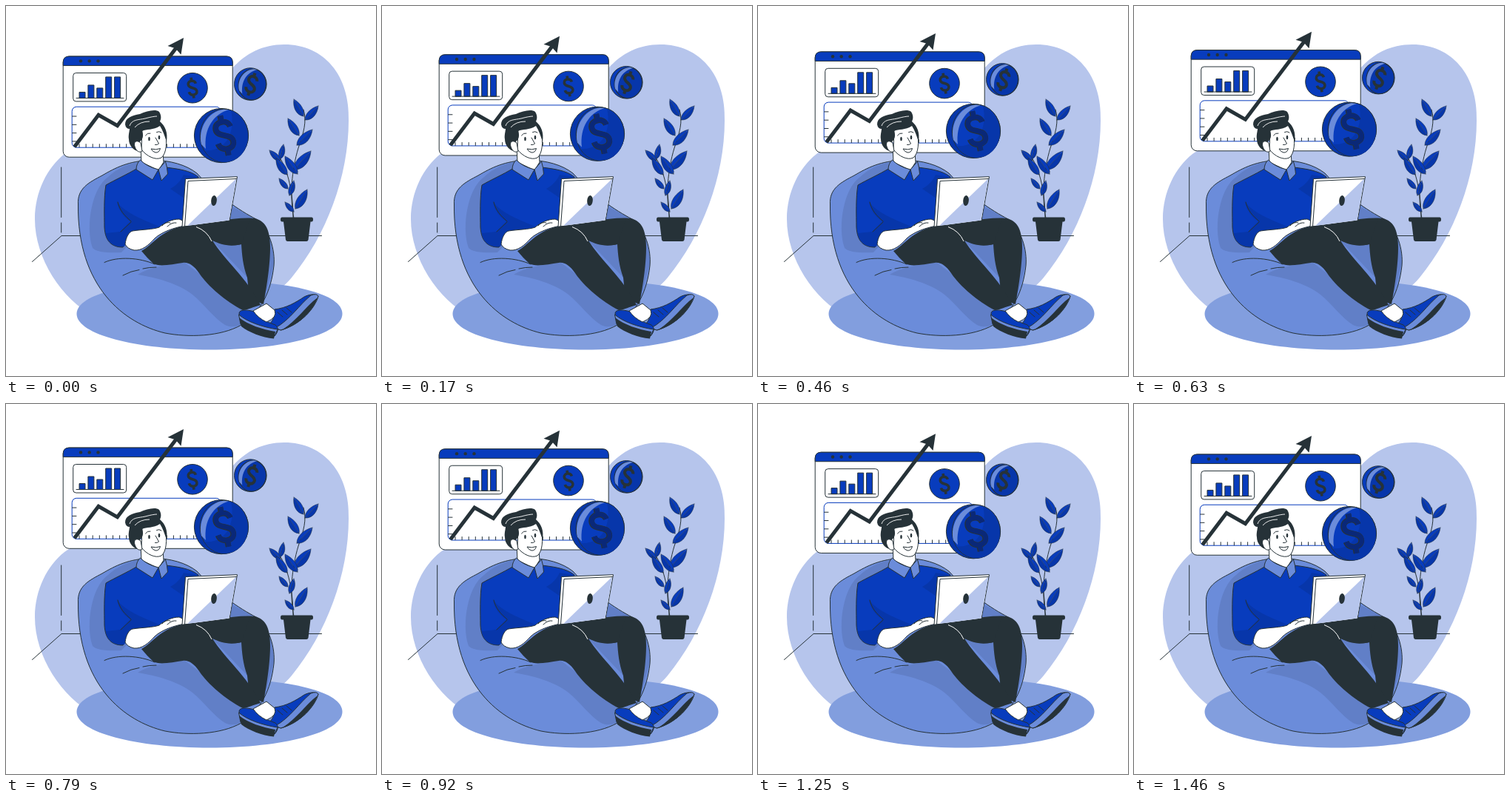
An HTML page that plays this animation: 500x500 px, repeating every 1.5 s.

```html
<!DOCTYPE html>
<html lang="en">
<head>
<meta charset="utf-8">
<title>Growing investments</title>
<style>
html, body { margin: 0; width: 100%; height: 100%; overflow: hidden; background: #fff; }
svg { display: block; width: 100vw; height: 100vh; }
.ink { fill: none; stroke: #263238; stroke-width: 1; stroke-linecap: round; stroke-linejoin: round; }
.edge { stroke: #263238; stroke-width: 1; stroke-linejoin: round; }
.fine { stroke-width: .5; }
.blue { fill: #083cbd; }
.deep { fill: #0736aa; }
.mid { fill: #6b8cda; }
.shade { fill: #617fc7; }
.pale { fill: #b6c5ec; }
.dark { fill: #263238; }
.white { fill: #fff; }
</style>
</head>
<body>
<svg viewBox="0 0 500 500" xmlns="http://www.w3.org/2000/svg">
  <defs>
    <path id="dollar" fill="none" d="M5.200 -5.400C4.400 -11 -5 -11 -5 -5.200C-5 .8 5.200 -.8 5.200 5.200C5.200 11 -4.600 11 -5.400 4.800M0 -14V-9.500M0 9.500V14"/>
    <path id="bag" d="M97.500 268C96 246 113 238 130 229C147 219 166 209 196 208.500C222 208 244 215 258 226C285 256 315 276 338 288C356 301 364 330 362 351C358 386 345 413 318 431C290 447 246 448 215 442C160 429 96 380 97.500 268Z"/>
  </defs>

  <!-- backdrop -->
  <path class="pale" d="M376 52C430 52 465 94 463 155C463 230 433 310 386 367C366 391 330 410 280 420H120C75 396 39 341 39 288C39 251 56 218 79 200C140 160 250 150 306 84C324 64 347 52 376 52Z"/>
  <path fill="#829ede" d="M95.500 416C95.500 389 170 371 275 371C386 371 454.500 389 454.500 416C454.500 444 374 464.500 275 464.500S95.500 444 95.500 416Z"/>
  <path class="ink" d="M35.500 345.500L75 310.500H102M353 310.500H426.500M74.700 218V285.500M74.700 293V306"/>

  <!-- plant -->
  <g id="plant">
    <path class="ink" d="M389 287C383 257 386 222 395 192C402 172 407 156 402 140M388 287C388 252 381 222 370 205"/>
  </g>
  <path class="dark" d="M373 285.500H413Q415 285.500 415 288.500T413 291.500H411.500L408.500 316Q408 318 406 318H380.500Q378.500 318 378 316L375 291.500H373Q371 291.500 371 288.500T373 285.500Z"/>

  <!-- floating dashboard -->
  <g id="float">
    <rect class="white edge" x="77.200" y="68.300" width="229" height="136.200" rx="8"/>
    <path class="blue edge" d="M77.200 80.800V76.300Q77.200 68.300 85.200 68.300H298.200Q306.200 68.300 306.200 76.300V80.800Z"/>
    <g class="dark"><circle cx="101" cy="74.600" r="2.200"/><circle cx="112.700" cy="74.600" r="2.200"/><circle cx="124.500" cy="74.600" r="2.200"/></g>
    <rect class="white edge" x="90.700" y="90.700" width="72" height="38.500" rx="4"/>
    <g id="bars" class="blue edge"></g>
    <path class="ink" d="M95 124.700H159"/>
    <rect x="89.200" y="136.500" width="201" height="55" rx="6" fill="#fff" stroke="#083cbd"/>
    <path id="ticks" class="ink"/>
    <path d="M92.500 190.500L125 147.500L150.500 162L231 55.500" fill="none" stroke="#263238" stroke-width="5"/>
    <path class="dark" d="M240 43.300L218.500 54.300L229 57.500L236.500 66Z"/>
    <circle class="blue edge" cx="252" cy="111" r="20.300"/>
    <use href="#dollar" transform="translate(252 111) rotate(-8)" stroke="#263238" stroke-width="3.600"/>

    <g transform="translate(330.300 105.800)">
      <circle class="blue edge" r="21.800"/>
      <ellipse class="deep edge" cx="2.500" cy=".3" rx="18.700" ry="20.800" transform="rotate(8)"/>
      <path d="M-15 9C-19 -6 -8 -20 5 -20.300L9 -19.500C-4 -16 -13 -5 -11 13Z" fill="#6b8cda"/>
      <use href="#dollar" transform="translate(1.500 .300) rotate(17) scale(1.130)" stroke="#263238" stroke-width="3.600"/>
    </g>

    <g transform="translate(291 175.300)">
      <circle class="deep edge" r="36.600"/>
      <ellipse class="blue edge" cx="3.800" cy=".2" rx="32.500" ry="36"/>
      <path class="deep" d="M13 -34C29 -27 36 -12 36 1C36 20 23 36 4 36C-7 36 -17 29 -23 20C5 23 20 -3 13 -34Z"/>
      <path d="M-27 12C-32 -9 -18 -33 3 -35.300L10 -34.700C-11 -29 -24 -8 -21 18Z" fill="#6b8cda"/>
      <g transform="translate(4 0) rotate(-12) scale(1.950)">
        <use href="#dollar" stroke="#263238" stroke-width="4"/>
        <use href="#dollar" x=".25" stroke="#0a2878" stroke-width="3.200"/>
      </g>
    </g>
  </g>

  <!-- beanbag -->
  <use href="#bag" class="mid"/>
  <path class="shade" d="M196 209C168 210 150 220 138 231C116 246 107 298 117 327C122 333 140 334 156 333L170 318L150 240L182 218ZM178 363C192 354 222 348 242 347L320 406L324 427C313 434 304 435 296 431C280 421 268 403 252 390C233 375 203 367 178 363ZM270 308L303 270L338 288C355 299 362 325 362 348L352 385L327 368Z"/>
  <use href="#bag" class="ink"/>
  <path class="ink" d="M133 346.500C151 338 181 340 201 349M158 364Q169 358 180 356.500M185 355Q193 353 203 353"/>

  <!-- shoes and ankle -->
  <path class="blue edge" d="M363 410C379 408 391 401 403 393C411 389 419 389 422 392C416 410 398 430 372 438C366 437 361 434 356 430Q364 422 363 410Z"/>
  <path class="mid edge" d="M364 435C384 424 396 404 412 391Q420 388 422 392C418 408 398 431 371 438Z"/>
  <path class="dark" d="M374 437C393 425 404 407 421 394C416 410 397 431 374 437Z"/>
  <path class="ink" d="M367 414L374 420M373 411L380 417M379 408L386 414"/>
  <path class="blue edge" d="M315 415C316 410 324 410 336 413C343 423 353 427 364 431C369 435 368 440 363 446L317 427Z"/>
  <path class="mid edge" d="M314.500 417C326 427 347 434 367 437L363 446L317 430Z"/>
  <path class="dark" d="M315 421C327 431 347 437 364 440L362 449.500C346 448 328 441 318 433Z"/>
  <path class="white edge" d="M334 412L352 402L363 411Q367 421 352 427Q341 422 334 412Z"/>

  <!-- far leg, then torso -->
  <path class="dark" d="M245 300C270 293 305 286 329 286.500C346 286 354 297 356 312C359 332 355 365 348 403L329 396L326 367C320 350 319 337 318 322C301 326 287 320 275 315Z"/>
  <path class="blue edge" d="M178 219C163 228 147 235 135 242C132 259 133 282 133 299C134 317 142 326 158 326L171 306L210 300L242 292L260 231C249 222 232 220 216 218Z"/>
  <path class="deep" d="M222 247C231 242 237 235 240 228L259 231L244 262ZM150 265C161 279 181 287 207 298L169 305L160 325C147 326 136 320 135 307L154 305L168 291Q153 281 150 265Z"/>
  <path class="ink" d="M151 265C154 277 160 283 169 291M155 305L169 292"/>
  <path class="white edge" d="M161 322C162 313 166 305 171 304C184 302 199 302 207 299C214 293 224 288 234 288Q241 290 241 297C226 300 211 305 201 314C193 323 184 331 173 330Q164 328 161 322Z"/>
  <path class="ink" d="M211 297Q216 291 222 293M218 298Q224 292 230 293"/>

  <!-- laptop -->
  <path class="white edge" d="M242.500 233.500L312.500 230.700L302 290L238 298.500Z"/>
  <path class="pale" d="M311.500 233L301.500 289.500L245 297Z"/>
  <path class="ink" d="M241.500 298L246 236.500L311.500 233.500"/>
  <ellipse class="dark" cx="281" cy="263" rx="3.800" ry="7" transform="rotate(5 281 263)"/>

  <!-- near leg -->
  <path class="dark" d="M183 331C198 324 212 297 253 296.500L330 287L318 322C301 326 290 322 279 317C295 343 326 368 344 404C336 406 326 411 320 411C297 399 273 379 261 361C254 351 247 346 239 347C225 349 207 353 199 348Q191 341 183 331Z"/>
  <path d="M257 298.500Q272 304 278 318" fill="none" stroke="#fff"/>

  <!-- head -->
  <path class="white edge" d="M182 190L183 211L206 222L213 211L212 198Z"/>
  <path class="mid edge" d="M181.500 208Q176 213 176 221L198 235L206 221Q190 217 181.500 208ZM206 221L215.500 210Q218 218 218.500 227L210 236Z"/>
  <path class="white edge" d="M184 165C197 154 211 157 215 169C218 184 217 199 210 205C202 209 190 203 183 194Z"/>
  <path class="dark" d="M161 160C161 151 170 148 181 146C190 142 202 139 207 143C210 148 210 152 208 156C215 162 219 171 217 183C214 175 212 168 208 162C199 168 190 166 184 169C187 177 183 182 181 183L180 196C172 196 166 188 166 180C165 175 167 169 167 166Q162 166 161 160Z"/>
  <path class="white edge" d="M182 185C176 180 172 184 174 190C176 196 180 199 184 196Z"/>
  <path d="M167 162C170 153 179 154 188 152Q199 149 204 149M174 164Q181 156 194 156" fill="none" stroke="#fff" stroke-width=".9"/>
  <g class="dark"><ellipse cx="193.500" cy="179.500" rx="1.300" ry="2.700"/><ellipse cx="207" cy="177.500" rx="1.300" ry="2.700"/></g>
  <path class="ink" d="M188.500 175Q191 171 195 172M203.500 170.500Q207 168.500 210 171M202 178L206.500 186Q205 188 201.500 187.500"/>
  <path class="white edge" d="M196 193Q203 195 208.500 192.500Q207 198.500 202 198Q198 197 196 193Z"/>
</svg>
<script>
const $ = id => document.getElementById(id);

function add(parent, tag, attrs) {
  const el = document.createElementNS('http://www.w3.org/2000/svg', tag);
  for (const k in attrs) el.setAttribute(k, attrs[k]);
  parent.append(el);
}

// A slim leaf from base to tip, with one darker half.
function leaf(bx, by, tx, ty) {
  const dx = tx - bx, dy = ty - by, side = Math.sign(dx);
  const at = (u, v) => `${bx + dx * u - dy * v * side} ${by + dy * u + dx * v * side}`;
  const half = v => `M${at(0, 0)}C${at(.2, v)} ${at(.65, v)} ${at(1, 0)}`;
  add($('plant'), 'path', { class: 'blue', d: half(-.22) + 'Z' });
  add($('plant'), 'path', { class: 'deep', d: half(.28) + 'Z' });
  add($('plant'), 'path', { class: 'ink fine', d: half(-.22) + half(.28) + `M${at(0, 0)}L${at(.85, 0)}` });
}

[
  [402, 149, 389, 126], [404, 154, 422, 135], [396, 175, 381, 152],
  [393, 188, 414, 167], [389, 221, 412, 196], [394, 227, 377, 203],
  [391, 274, 407, 248], [389, 278, 377, 265],
  [370, 207, 375, 187], [371, 209, 356, 195], [380, 228, 365, 206],
  [381, 247, 369, 233], [383, 256, 389, 236]
].forEach(p => leaf(...p));

[8, 17.5, 13.5, 28.5, 28.5].forEach((h, i) =>
  add($('bars'), 'rect', { x: 99 + i * 11.9, y: 124.7 - h, width: 8, height: h }));

let ticks = '';
for (let i = 0; i < 4; i++) ticks += `M89.500 ${149.3 + i * 11.3}h5.500`;
for (let x = 99; x < 256; x += 9.1) ticks += `M${x} 191v-4`;
$('ticks').setAttribute('d', ticks);

const LOOP = 1500, LEAD = 20, LIFT = 10;

function draw(ms) {
  const p = ((ms + LEAD) % LOOP) / LOOP;
  const y = -LIFT * (1 - Math.abs(1 - 2 * p));
  $('float').setAttribute('transform', `translate(0 ${y.toFixed(3)})`);
}

let start;
function tick(now) {
  start ??= now;
  draw(now - start);
  requestAnimationFrame(tick);
}
draw(0);
requestAnimationFrame(tick);
</script>
</body>
</html>
```
